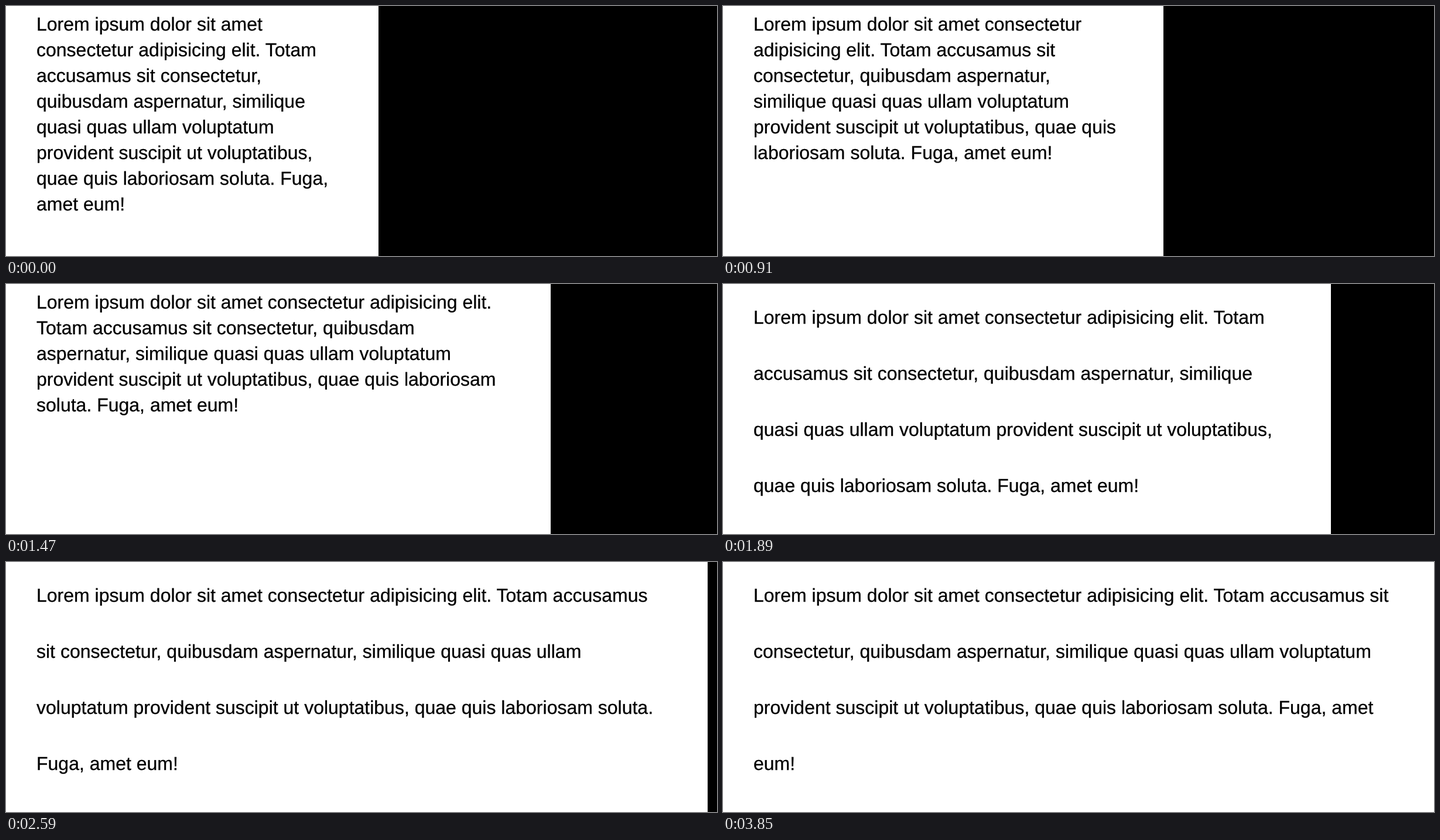
Write an HTML page that moves like this. It is 1214 px wide and 428 px high and loops after 3920 ms.

```html
<!DOCTYPE html>
<html lang="la">
<head>
<meta charset="utf-8">
<title>Resizing column</title>
<style>
  html, body { margin: 0; width: 100%; height: 100%; overflow: hidden; background: #000; }
  #page { position: absolute; left: 0; top: 0; height: 100%; background: #fff; }
  #copy {
    position: absolute; left: 52px; top: 9px; margin: 0;
    font: 32px/44px "Liberation Sans", Arial, Helvetica, sans-serif;
    text-rendering: geometricPrecision;
    color: #000; -webkit-text-stroke: 0.3px #000;
  }
  #copy.airy { line-height: 96px; }
</style>
</head>
<body>
<div id="page">
  <p id="copy">Lorem ipsum dolor sit amet consectetur adipisicing elit. Totam accusamus sit consectetur, quibusdam aspernatur, similique quasi quas ullam voluptatum provident suscipit ut voluptatibus, quae quis laboriosam soluta. Fuga, amet eum!</p>
</div>
<script>
  const LOOP = 3920, STEP = 70;
  const LEFT = 52, RIGHT = 72, BREAKPOINT = 980;

  // Key points of the drag: time in ms, right edge of the page in px.
  const drag = [[0, 636], [560, 650], [910, 752], [1120, 828], [1680, 990], [2660, 1214]];

  const page = document.getElementById("page");
  const copy = document.getElementById("copy");

  function edgeAt(t) {
    const i = drag.findIndex(([time]) => time > t);
    if (i < 0) return drag[drag.length - 1][1];
    const [t0, x0] = drag[i - 1], [t1, x1] = drag[i];
    return Math.round((x0 + (x1 - x0) * (t - t0) / (t1 - t0)) / 2) * 2;
  }

  function draw(now) {
    const t = Math.floor((now % LOOP) / STEP) * STEP;
    const edge = edgeAt(t);
    page.style.width = edge + "px";
    copy.style.width = edge - LEFT - RIGHT + "px";
    copy.classList.toggle("airy", edge >= BREAKPOINT);
  }

  const start = performance.now();
  function tick() {
    draw(performance.now() - start);
    requestAnimationFrame(tick);
  }
  tick();
</script>
</body>
</html>
```
